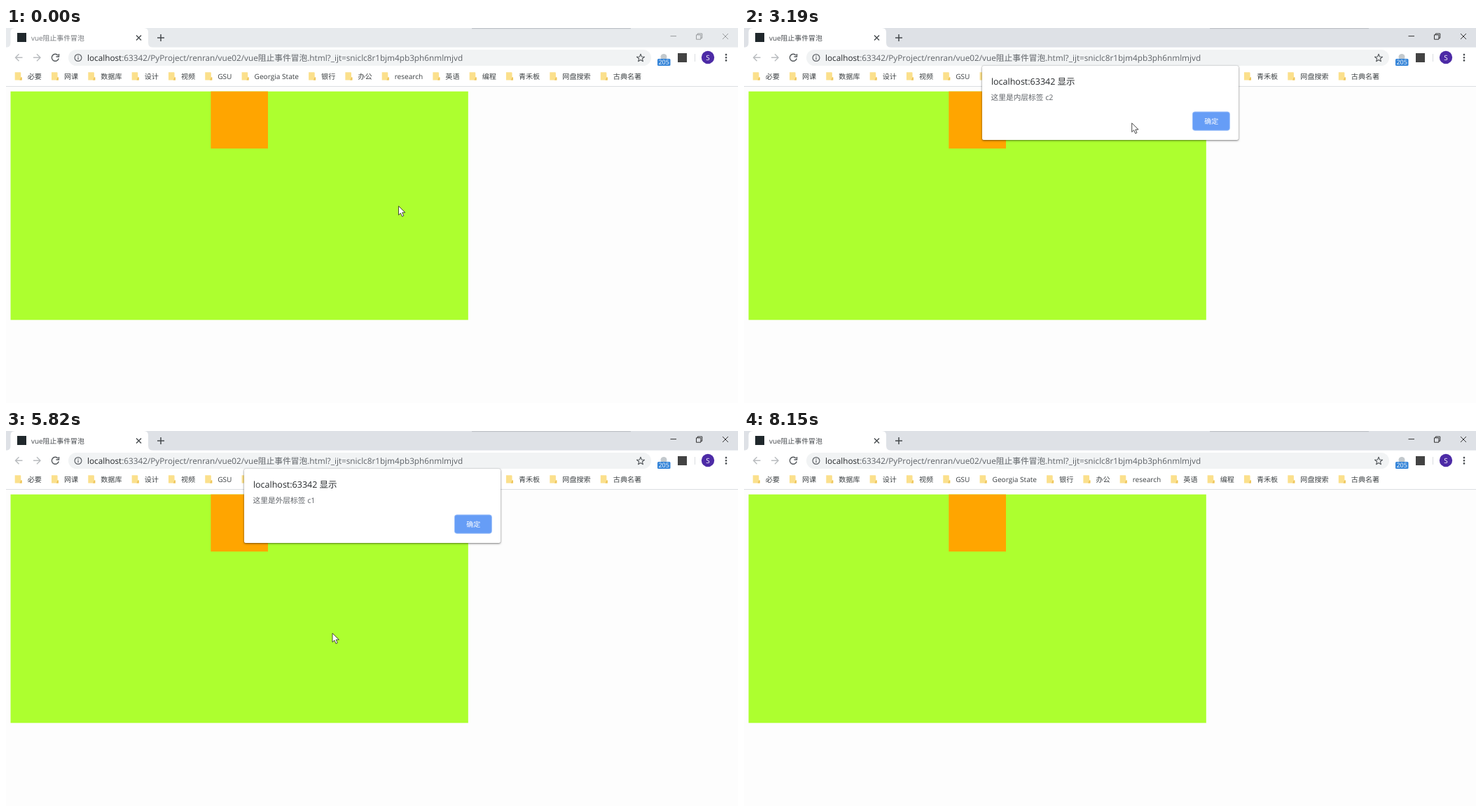
An HTML page for the animation above (8650 ms loop, 1045 px wide and 536 px high).

```html
<!DOCTYPE html>
<html lang="zh">
<head>
<meta charset="utf-8">
<title>vue阻止事件冒泡</title>
<style>
  html, body { margin: 0; width: 100%; height: 100%; overflow: hidden; background: #fff; }
  #stage { position: relative; width: 1045px; height: 536px; overflow: hidden; background: #fdfdfd; }
  #stage, text { font-family: "Open Sans", "Noto Sans CJK SC", "Noto Sans CJK", sans-serif; }
  svg { position: absolute; left: 0; top: 0; display: block; }
  text { text-rendering: geometricPrecision; white-space: pre; }
  #strip { fill: #e7eaed; }
  #title { fill: #75787c; }
  #controls { stroke: #909396; }
  .active #strip { fill: #dee1e6; }
  .active #title { fill: #45494d; }
  .active #controls { stroke: #222; }
  #dialog {
    position: absolute; left: 340.4px; top: 54px; width: 366px; height: 105.6px;
    background: #fff; border-radius: 2px; opacity: 0;
    box-shadow: 0 1px 3px rgba(0,0,0,.5), 0 0 1px rgba(0,0,0,.4);
  }
</style>
</head>
<body>
<div id="stage">
  <svg width="1045" height="536" fill="none">
    <rect id="strip" width="1045" height="28"/>
    <rect x="665" width="227" height="1.3" rx=".6" fill="#bfc3c8"/>
    <path d="M0 28Q6.5 28 6.5 21V6Q6.5 0 13 0H197Q203 0 203 6V21Q203 28 210 28Z" fill="#fff"/>
    <rect x="16" y="7" width="13" height="13" fill="#20282c"/>
    <text id="title" x="36" y="17.8" font-size="9.9">vue阻止事件冒泡</text>
    <path d="M186 10.5l7 7m0-7l-7 7" stroke="#45494d" stroke-width="1.4"/>
    <path d="M216 14h10m-5-5v10" stroke="#45494d" stroke-width="1.5"/>
    <g id="controls" stroke-width=".9">
      <path d="M948.5 11.6h8.5M1023 8l8 8m0-8l-8 8"/>
      <path d="M985.5 9.8h6.4v6.4h-6.4zM987.3 9.8V8h6.4v6.4h-1.8"/>
    </g>

    <rect y="27.7" width="1045" height="56" fill="#fff"/>
    <path d="M0 83.5H1045" stroke="#dcdee1"/>
    <rect x="89" y="31" width="832" height="23" rx="11.5" fill="#f1f3f4"/>
    <g stroke-width="1.4">
      <path d="M23.5 42.3H13.5m5-5l-5 5 5 5M39 42.3h10m-5-5l5 5-5 5" stroke="#b9bcbf"/>
      <path d="M74.2 39.1A5 5 0 1 0 75.2 43.5M75.5 37v4h-4" stroke="#54585c"/>
      <g stroke="#5f6368" stroke-width="1.2">
        <circle cx="103" cy="42.5" r="4.9"/>
        <path d="M103 41.8v3.4M103 39.6v1.2"/>
      </g>
    </g>
    <text x="116" y="46.5" font-size="11.76" fill="#5f6368"><tspan fill="#25282b">localhost</tspan>:63342/PyProject/renran/vue02/vue阻止事件冒泡.html?_ijt=sniclc8r1bjm4pb3ph6nmlmjvd</text>
    <path id="star" stroke="#54585c" stroke-width="1.1" stroke-linejoin="round"/>
    <circle cx="939" cy="41.5" r="4.5" fill="#c3c9cd"/>
    <rect x="930" y="44" width="18.5" height="10" rx="1.5" fill="#3484d8"/>
    <text x="939.2" y="52.4" font-size="9" fill="#fff" text-anchor="middle">205</text>
    <rect x="959" y="36" width="13" height="13" fill="#434343"/>
    <path d="M983.5 37v11" stroke="#dadce0"/>
    <circle cx="1002" cy="42" r="9.2" fill="#4d2ba6"/>
    <text x="1002" y="45.7" font-size="10" fill="#fff" text-anchor="middle">S</text>
    <path d="M1028 38.2v8.3" stroke="#4c5054" stroke-width="2.7" stroke-linecap="round" stroke-dasharray="0 4.1"/>
    <g id="marks" font-size="10.1"></g>

    <!-- the web page, in its own pixels -->
    <g transform="scale(.8166)">
      <rect x="8" y="111" width="800" height="400" fill="#adff2f"/>
      <rect x="358" y="111" width="100" height="100" fill="#ffa500"/>
    </g>
  </svg>

  <div id="dialog">
    <svg width="366" height="105">
      <text x="12.9" y="26.5" font-size="12.5" fill="#25282b">localhost:63342 显示</text>
      <text id="message" x="12.6" y="49" font-size="10.7" fill="#5f6368"></text>
      <rect x="300.5" y="65.9" width="52.8" height="26.4" rx="3" fill="#669df6" stroke="#94bbf9"/>
      <text x="327.2" y="83.3" font-size="10" font-weight="500" fill="#fff" text-anchor="middle">确定</text>
    </svg>
  </div>

  <svg width="1045" height="536">
    <g id="cursor">
      <circle id="press" r="10" fill="#ff0" fill-opacity=".47"/>
      <path d="M.5 .6V13.3L3.4 10.6L5.5 15.4L7.7 14.4L5.7 9.8H9.8Z" fill="#fff" stroke="#2a2a2a" stroke-width=".85"/>
    </g>
  </svg>
</div>

<script>
const LOOP = 8650, FOCUS = 1930, TICK = 65;
const PRESS_DELAY = 380, PRESS_TIME = 160, FADE_IN = 70, FADE_OUT = 200;
const $ = id => document.getElementById(id);
const clamp = p => Math.min(1, Math.max(0, p));
const smooth = p => p * p * (3 - 2 * p);

const bookmarks = ['必要', '网课', '数据库', '设计', '视频', 'GSU', 'Georgia State', '银行',
  '办公', 'research', '英语', '编程', '青禾板', '网盘搜索', '古典名著'];

const home = { x: 560, y: 254 };
const moves = [
  { from: 290, to: 960, x: 327, y: 134 },
  { from: 2640, to: 3600, x: 669, y: 136 },
  { from: 4430, to: 5240, x: 465.5, y: 288.5 },
  { from: 6110, to: 6940, x: 659, y: 140 },
  { from: 7560, to: 8150, x: 612, y: 550 }
];

const dialogs = [
  { open: 2070, close: 4030, text: '这里是内层标签 c2' },
  { open: 5750, close: 7366, text: '这里是外层标签 c1' }
];

function addBookmarks() {
  let x = 12.7;
  for (const name of bookmarks) {
    $('marks').insertAdjacentHTML('beforeend', `<g transform="translate(${x} 63.3)">
      <path d="M0 0h7.6q1 0 1 1v6.2h1.4v4h-10z" fill="#fbe08c"/>
      <path d="M8.6 7.2h1.4v4h-3.2z" fill="#eec55c"/>
      <text x="18" y="9.7" fill="#3c4043">${name}</text></g>`);
    x += 32.1 + $('marks').lastElementChild.querySelector('text').getComputedTextLength();
  }
}

function drawStar() {
  const points = Array.from({ length: 10 }, (_, i) => {
    const r = i % 2 ? 2.5 : 5.8, a = i * Math.PI / 5 - Math.PI / 2;
    return `${906 + r * Math.cos(a)} ${43 + r * Math.sin(a)}`;
  });
  $('star').setAttribute('d', `M${points.join('L')}Z`);
}

// The screen was sampled in ticks, so the pointer moves in small jumps.
function cursorAt(t) {
  let { x, y } = home;
  for (const m of moves) {
    if (t < m.from) break;
    const ticks = Math.floor((t - m.from) / TICK) + 1;
    const p = smooth(clamp(ticks * TICK / (m.to - m.from)));
    x += (m.x - x) * p;
    y += (m.y - y) * p;
  }
  return [x, y];
}

function drawDialog(t) {
  const step = Math.floor(t / 70) * 70;
  const d = dialogs.findLast(d => t >= d.open);
  const out = d ? clamp((step - d.close) / FADE_OUT) : 1;
  const opening = d && t < d.open + FADE_IN;
  const lift = 10 * out;
  $('dialog').style.opacity = opening ? .5 : 1 - out ** 3.6;
  $('dialog').style.transform = opening ? 'translateY(1px)' : out
    ? `translateY(${-lift}px) perspective(1500px) rotateX(${lift}deg) scale(${1 + lift * .0004})`
    : 'none';
  $('message').textContent = d ? d.text : '';
}

function draw(t) {
  $('cursor').setAttribute('transform', `translate(${cursorAt(t)})`);
  const pressed = moves.some(({ to }) => t >= to + PRESS_DELAY && t < to + PRESS_DELAY + PRESS_TIME);
  $('press').style.display = pressed ? '' : 'none';
  $('stage').classList.toggle('active', t >= FOCUS);
  drawDialog(t);
}

addBookmarks();
drawStar();
const origin = performance.now();
(function loop() {
  draw((performance.now() - origin) % LOOP);
  requestAnimationFrame(loop);
})();
</script>
</body>
</html>
```
